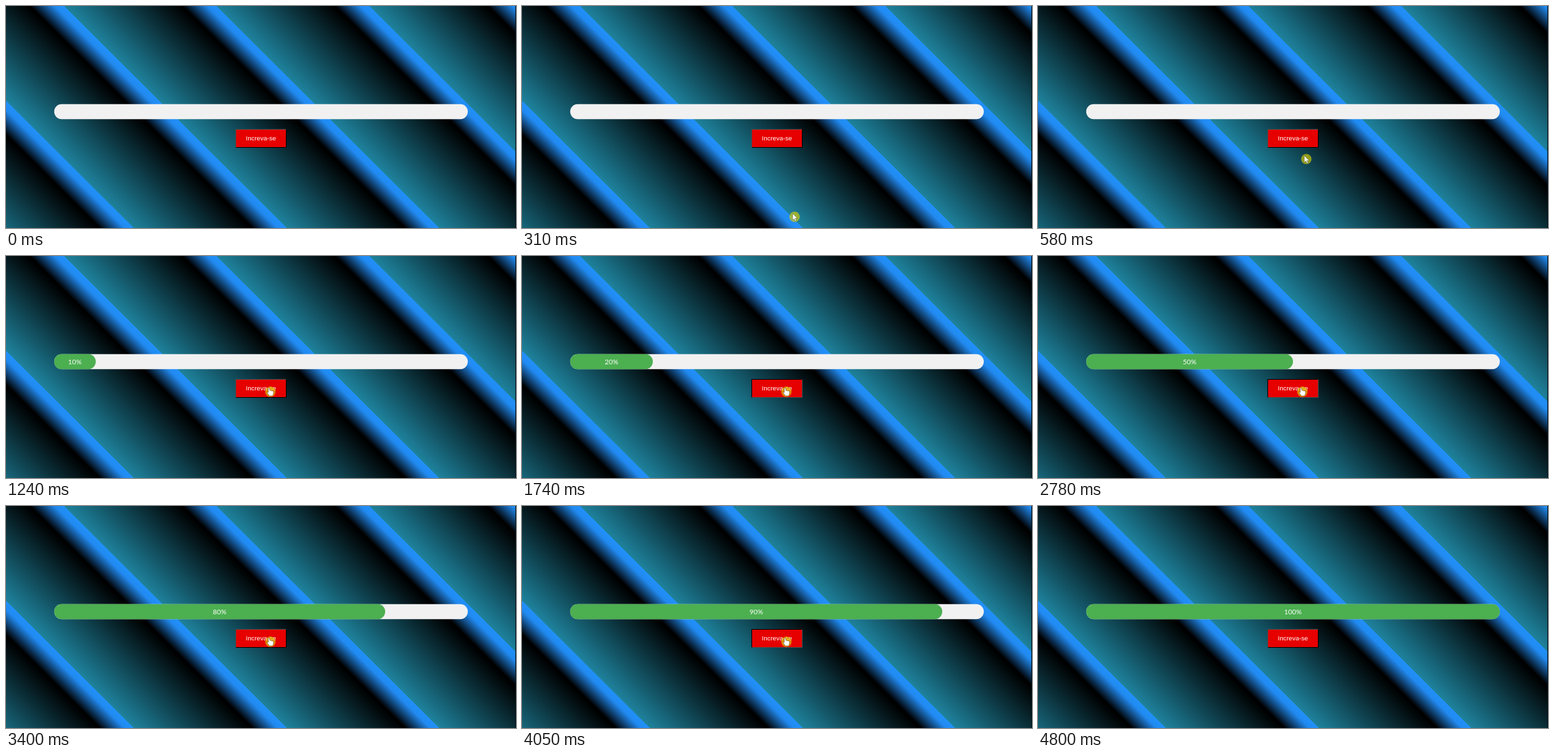
An HTML page that plays this animation: 760x332 px, repeating every 4900 ms.

```html
<!DOCTYPE html>
<html lang="pt">
<head>
<meta charset="utf-8">
<style>
  html, body { margin: 0; width: 100%; height: 100%; overflow: hidden; }
  #stage {
    position: relative; width: 760px; height: 332px; overflow: hidden;
    background: repeating-linear-gradient(45deg, #1e829c 134.9px, #000 258px, #000 260px, #218af0 286px, #2190fa 295.8px);
    box-shadow: inset -1px 0 #001018;
  }
  #stage > * { position: absolute; box-sizing: border-box; }
  /* a page shown at 72% */
  #track, #button { left: 380px; transform: translate(-50%, -50%) scale(.72); }
  #track { top: 158px; width: 856px; height: 31px; border-radius: 16px; background: #f1f1f1; }
  #fill {
    height: 100%; border-radius: 16px; background: #4caf50; color: #fff; overflow: hidden;
    font: 14.4px/31px Lato, "Open Sans", sans-serif; text-align: center;
  }
  #button {
    top: 198px; width: 107px; height: 40px; border-radius: 3px;
    border: 2px solid; border-color: #4c4c4c #000 #000 #4c4c4c;
    background: #e60000; color: #fff; text-align: center;
    font: 13.33px/36px "Liberation Sans", Arial, sans-serif;
  }
  #button.down { border-color: #000 #4c4c4c #4c4c4c #000; }
  #cursor { left: -10px; top: -10px; width: 20px; height: 20px; }
  #cursor path { fill: #fff; stroke: #333; stroke-width: .4; }
</style>
</head>
<body>
<div id="stage">
  <div id="track"><div id="fill"></div></div>
  <div id="button">Increva-se</div>
  <svg id="cursor" viewBox="-10 -10 20 20">
    <circle r="7.7" fill="#dcd200" fill-opacity=".65"/>
    <path id="arrow" d="M-3-5V5l2.3-2L.9 6.4l1.6-.7L.9 2.3h3.3z"/>
    <path id="hand" d="M-3-5q1-1.2 2 0V-2L3.8-1Q5-.6 4.8 1L4 4.3 3.4 6h-5L-4.8 1.4Q-4.8 0-3.6.6l.6.7z"/>
  </svg>
</div>
<script>
const LOOP = 4900, ENTER = 280, LEAVE = 4330;
const $ = id => document.getElementById(id);

// each release adds 10%; the button is held for the last part of every interval
const releases = [1160, 1520, 1910, 2270, 2450, 2970, 3290, 3400, 3730, 4140];
const HOLD = .45;

function pointer(t) {
  if (t < LEAVE) {
    const left = Math.max(0, 1 - (t - ENTER) / 550);
    return [394 + 13 * left, 203 + 126 * left ** 2];
  }
  const u = (t - LEAVE) / 330;
  return [394 + 4 * u + 8 * Math.sin(Math.PI * u), 203 + 136 * u];
}

function draw(t) {
  const count = releases.filter(r => t >= r).length;
  $('fill').style.width = count * 10 + '%';
  $('fill').textContent = count ? count * 10 + '%' : '';

  const next = releases[count], last = releases[count - 1] || 830;
  $('button').className = t >= next - HOLD * (next - last) ? 'down' : '';

  const [x, y] = pointer(t), over = y < 212;
  $('cursor').style.display = t < ENTER ? 'none' : '';
  $('cursor').style.transform = `translate(${x}px, ${y}px)`;
  $('hand').style.display = over ? '' : 'none';
  $('arrow').style.display = over ? 'none' : '';
}

const start = performance.now();
function tick() {
  draw((performance.now() - start) % LOOP);
  requestAnimationFrame(tick);
}
tick();
</script>
</body>
</html>
```
